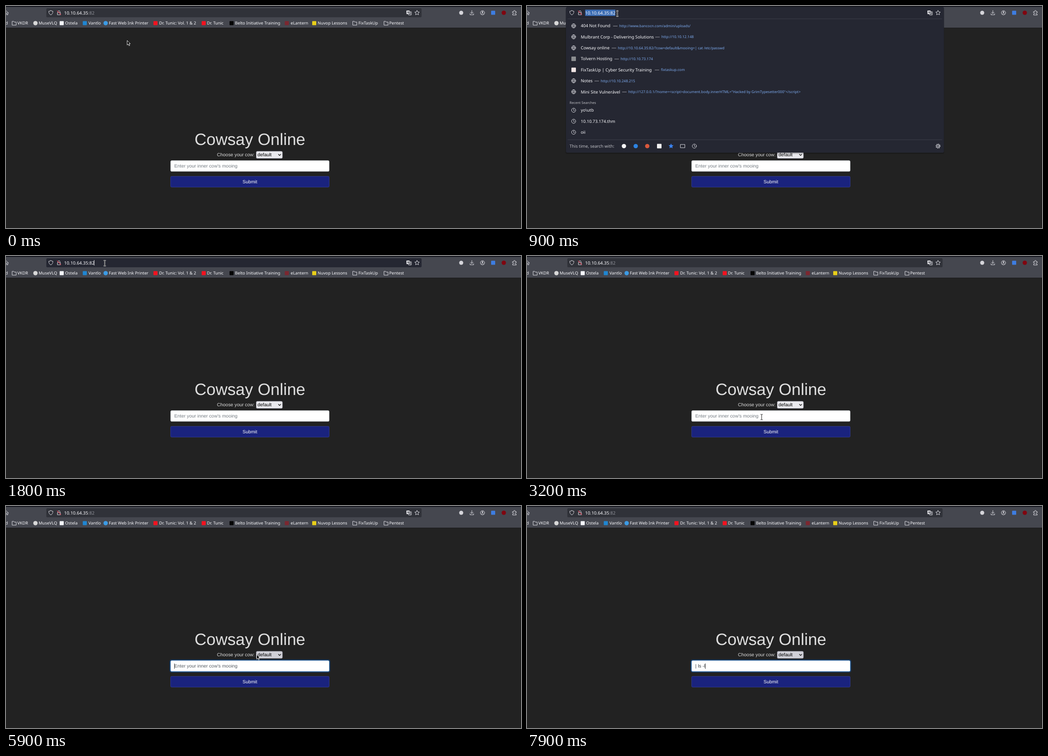
An HTML page for the animation above (8000 ms loop, 1137x492 px).

```html
<!DOCTYPE html>
<html lang="en">
<head>
<meta charset="utf-8">
<title>Cowsay Online</title>
<style>
  html, body { margin: 0; width: 100%; height: 100%; overflow: hidden; background: #222; }
  svg { display: block; width: 100vw; height: 100vh; }
  text { white-space: pre; text-rendering: geometricPrecision; }
  .ui { font-family: "Noto Sans", "Open Sans", sans-serif; fill: #fbfbfe; }
  .page { font-family: "Liberation Sans", Arial, sans-serif; font-size: 10.4px; }
  .line { fill: none; stroke: #dcdce2; stroke-width: 1; stroke-linecap: round; stroke-linejoin: round; }
</style>
</head>
<body>
<svg id="stage" viewBox="0 0 1137 492" preserveAspectRatio="none"></svg>
<script>
const LOOP = 8000, STEP = 100;
const stage = document.getElementById('stage');
const byId = id => document.getElementById(id);

const escapeText = s => s.replace(/&/g, '&amp;').replace(/</g, '&lt;');
const rect = (x, y, w, h, fill, extra = '') =>
  `<rect x="${x}" y="${y}" width="${w}" height="${h}" fill="${fill}" ${extra}/>`;
const circle = (x, y, r, fill, extra = '') => `<circle cx="${x}" cy="${y}" r="${r}" fill="${fill}" ${extra}/>`;
const line = (d, extra = '') => `<path class="line" d="${d}" ${extra}/>`;
const ui = (x, y, size, s, extra = '') =>
  `<text class="ui" x="${x}" y="${y}" font-size="${size}" ${extra}>${escapeText(s)}</text>`;
const page = (x, y, s, extra = '') => `<text class="page" x="${x}" y="${y}" ${extra}>${escapeText(s)}</text>`;
const group = (id, body, extra = '') => `<g id="${id}" ${extra}>${body}</g>`;

const square = (x, y, fill, size = 9) => rect(x - size / 2, y - size / 2, size, size, fill, 'rx="1"');
const dot = (x, y, fill) => circle(x, y, 4.8, fill);
const folder = (x, y) => line(`M${x - 4.5} ${y + 4}v-8h3.5l1.2 1.6h4.3v6.4z`);
const globe = (x, y) => circle(x, y, 4.6, 'none', 'class="line"') +
  line(`M${x - 4.6} ${y}h9.2M${x} ${y - 4.6}q-4.4 4.6 0 9.2q4.4 -4.6 0 -9.2`, 'stroke-width=".8"');
const clock = (x, y) => circle(x, y, 4.6, 'none', 'class="line"') + line(`M${x} ${y - 2.8}v3l2 1`);

function star(x, y, r, extra) {
  const points = Array.from({ length: 10 }, (_, i) => {
    const a = -Math.PI / 2 + i * Math.PI / 5, d = i % 2 ? r * .48 : r;
    return `${(x + d * Math.cos(a)).toFixed(2)},${(y + d * Math.sin(a)).toFixed(2)}`;
  });
  return `<polygon points="${points.join(' ')}" stroke-linejoin="round" ${extra}/>`;
}

function toolbar() {
  return rect(0, 0, 1137, 48, '#45474f') + rect(0, 0, 1137, 2, '#11121a') +
    line('M-4 15.5L0 10.5L5.5 15.5M4 14.5v5h-2.5v-4h-3') +
    circle(1005, 15, 4.5, '#d5d5da') +
    line('M1028.5 10v6.5M1025.5 13.8l3 3l3 -3M1024.5 17v2.5h8V17') +
    circle(1052, 15, 4.7, 'none', 'class="line"') + circle(1052, 13.5, 1.7, '#dcdce2') +
    line('M1049 18q3 -3 6 0') +
    square(1075.5, 15, '#3e7de0') + dot(1099, 15, '#800610') +
    line('M1118.5 12.5h2.5v-1.3a1.5 1.5 0 0 1 3 0v1.3h2.5v2.5h-1.2a1.5 1.5 0 0 0 0 3h1.2v2h-8v-2.5h1a1.3 1.3 0 0 0 0 -2.6h-1z');
}

function bookmarks() {
  const items = [
    [-1.5, 'd'],
    [25, 'VKDR', folder, 18],
    [72, 'MuseVLQ', dot, 65, '#d8d8d8'],
    [130.5, 'Ostela', square, 123, '#f4f6fb'],
    [182, 'Vantlo', square, 174, '#1f86d2'],
    [227, 'Fast Web Ink Printer', dot, 220, '#3c9be5'],
    [338, 'Dr. Tunic: Vol. 1 & 2', square, 330, '#f5121f'],
    [443.5, 'Dr. Tunic', square, 436.5, '#f5121f'],
    [505.5, 'Belto Initiative Training', square, 498, '#050505'],
    [628.5, 'eLantern', square, 620, '#7b2730'],
    [688, 'Nuvop Lessons', square, 680.5, '#e9cf19'],
    [778, 'FixTaskUp', folder, 770],
    [846, 'Pentest', folder, 839]
  ];
  return items.map(([x, label, icon, iconX, color]) =>
    (icon ? icon(iconX, 38, color) : '') + ui(x, 41.3, 9.2, label)).join('');
}

function suggestions() {
  const rows = [
    ['404 Not Found', 204, 'http://www.bancocn.com/admin/uploads/'],
    ['Mulbrant Corp - Delivering Solutions', 297, 'http://10.10.12.148'],
    ['Cowsay online', 201, 'http://10.10.64.35:82/?cow=default&mooing=| cat /etc/passwd'],
    ['Tolvern Hosting', 207, 'http://10.10.73.174', '#8b8d90'],
    ['FixTaskUp | Cyber Security Training', 296, 'fixtaskup.com', '#f0e4e4'],
    ['Notes', 163, 'http://10.10.248.215'],
    ['Mini Site Vulnerável', 224,
      'http://127.0.0.1/?nome=<script>document.body.innerHTML="Hacked by GrimTypesetter000"<\/script>']
  ];
  const visited = rows.map(([title, urlX, url, color], i) => {
    const y = 44 + i * 24.35;
    return (color ? square(103, y, color, 10) : globe(103, y)) + ui(118.7, y + 3.4, 9.45, title) +
      line(`M${urlX - 13.5} ${y + .5}h9`, 'stroke-width=".8" opacity=".65"') +
      ui(urlX - .3, y + 3, 8, url, 'style="fill:#7dabf0"');
  });
  const recent = ['yo\\utb', '10.10.73.174.thm', 'oii'].map((s, i) => {
    const y = 231 + i * 24.4;
    return clock(103, y) + ui(118.7, y + 3.4, 9.35, s);
  });
  const y = 310.5;
  const gear = circle(907.5, y, 3.6, 'none', 'class="line"') + circle(907.5, y, 1.3, 'none', 'class="line"') +
    circle(907.5, y, 4.6, 'none', 'stroke="#dcdce2" stroke-width="1.3" stroke-dasharray="1.8 1.81"');
  return rect(85, 4, 836, 324, '#000', 'rx="4" opacity=".2"') +
    rect(86, 2, 834.5, 323, '#252732', 'rx="3"') +
    line('M90 28.5H916M90 296.5H916', 'style="stroke:#3b3d48"') +
    visited.join('') + ui(94, 217.3, 7.6, 'Recent Searches', 'opacity=".72"') + recent.join('') +
    ui(94, 314, 9.45, 'This time, search with:', 'opacity=".72"') +
    dot(214, y, '#f4f4f4') + dot(240, y, '#2d83e2') + dot(265.5, y, '#d9583c') +
    square(292, y, '#f2f2f2', 10) + star(318, y, 5.8, 'fill="#3a83f4"') +
    line(`M339 ${y - 3.6}h9.5v7.2h-9.5z`) + clock(369.5, y) + gear;
}

function addressBar() {
  return rect(128.5, 8, 66.5, 14, '#3b6db4', 'id="selection"') +
    line('M99 10.2q2 1.3 4.5 1.3q.3 6 -4.5 8.3q-4.8 -2.3 -4.5 -8.3q2.5 0 4.5 -1.3z') +
    line('M114.8 14.5v-1.8a2.2 2.2 0 0 1 4.4 0v1.8M113.8 14.8h6.4v4.7h-6.4z') +
    line('M113 10.8l8 8.4', 'style="stroke:#e8384f;stroke-width:1.2"') +
    `<text class="ui" x="128.3" y="18.7" font-size="9.87">10.10.64.35<tspan id="port">:82</tspan></text>` +
    rect(194.2, 9, .9, 12, '#fbfbfe', 'id="urlCaret"') +
    rect(884, 10, 7, 8, '#e4e4e8', 'rx="1"') +
    rect(888.5, 12.5, 6.5, 7.5, '#3a3c45', 'rx="1" stroke="#e4e4e8" stroke-width=".9"') +
    line('M885.8 15.8l1.7 -4l1.2 3', 'style="stroke:#30323a"') +
    line('M890 15h3.5M891.8 14q0 2.5 -1.8 4M890.5 15.5l2.8 2.7', 'stroke-width=".7"') +
    star(907.5, 15.2, 5.4, 'class="line"');
}

function webPage() {
  return rect(0, 48, 1137, 444, '#222') + rect(1136, 48, 1, 444, '#151515') +
    rect(0, 48, 1137, .6, '#17181c') +
    page(538.5, 307.7, 'Cowsay Online', 'style="font-size:36.4px" text-anchor="middle" fill="#dedede"') +
    page(465.8, 333.3, 'Choose your cow:', 'fill="#dedede"') +
    rect(552.4, 321.9, 57.9, 15.8, '#e9e9ed', 'id="select" rx="2.5" stroke="#8f8f9d" stroke-width=".7"') +
    page(555.3, 333.3, 'default', 'fill="#000"') +
    line('M601.5 328.7l2.5 2.5l2.5 -2.5', 'style="stroke:#111;stroke-width:1.3"') +
    rect(362.1, 341.2, 352.8, 26.7, 'none', 'id="ring" rx="3.5" stroke="#007bff" stroke-width="2.1"') +
    rect(363.4, 342.6, 350.1, 24, '#fff', 'id="field" rx="2.6" stroke-width=".7"') +
    page(371.6, 358.4, "Enter your inner cow's mooing", 'id="placeholder"') +
    page(371.6, 358.4, '', 'id="typed" fill="#333a40"') +
    rect(371.5, 349, .9, 12, '#222', 'id="caret"') +
    rect(363.4, 377.4, 350.1, 24, '#1a237e', 'rx="2.3" stroke="#3a459f" stroke-width=".7"') +
    page(538.4, 393.3, 'Submit', 'text-anchor="middle" fill="#fff"') +
    group('history', '');
}

const arrow = '<path d="M.5 .5V10.5L2.800 8.300L4.600 12.100L6.200 11.400L4.500 7.700H7.500Z" fill="#000" stroke="#fff" stroke-width=".9"/>';
const beamPath = 'M-2.5 -6H-.5L0 -5.5L.5 -6H2.5M0 -5.5V5.5M-2.5 6H-.5L0 5.5L.5 6H2.5';
const beam = `<path d="${beamPath}" fill="none" stroke="#fff" stroke-width="2.2"/>` +
  `<path d="${beamPath}" fill="none" stroke="#111" stroke-width="1"/>`;

stage.innerHTML = toolbar() + bookmarks() + webPage() +
  rect(89, 5, 828.5, 20, '#303239', 'id="bar" rx="2.5"') +
  group('suggestions', suggestions()) + addressBar() +
  group('pointer', group('arrow', arrow) + group('beam', beam));

const path = [
  [0, 267, 76], [300, 205, 35], [500, 169, 17], [600, 196, 17], [800, 196, 17], [1200, 218, 16],
  [2300, 218, 16], [3200, 518, 357], [3900, 518, 357], [4000, 519, 356], [4100, 519, 356],
  [4400, 553, 329], [LOOP, 553, 329]
];
const keystrokes = [
  [6300, '|'], [6800, '| '], [7500, '| l'], [7600, '| ls'], [7700, '| ls '], [7800, '| ls -'], [7900, '| ls -l']
];
const pastEntries = ['| ls', '| id', '| pwd', '| whoami'];

function pointerAt(t) {
  const i = path.findIndex(([end], n) => n > 0 && t <= end);
  const [t0, x0, y0] = path[i - 1], [t1, x1, y1] = path[i];
  const p = (t - t0) / (t1 - t0), k = p * p * (3 - 2 * p);
  return [x0 + (x1 - x0) * k, y0 + (y1 - y0) * k];
}

const show = (id, on) => { byId(id).style.display = on ? '' : 'none'; };
const within = (x, y, l, t, r, b) => x >= l && x <= r && y >= t && y <= b;

function drawPointer(t) {
  const [x, y] = pointerAt(t);
  const overText = y < 25 || within(x, y, 363, 343, 713, 367) || within(x, y, 417, 277, 660, 314);
  byId('pointer').setAttribute('transform', `translate(${x} ${y})`);
  show('pointer', t < 6300);
  show('arrow', !overText);
  show('beam', overText);
}

function drawAddress(t) {
  const focused = t >= 900 && t < 1900;
  show('suggestions', t >= 900 && t < 1800);
  show('selection', t >= 900 && t < 1400);
  show('urlCaret', t >= 1400 && t < 1900);
  byId('bar').setAttribute('fill', focused ? '#252732' : '#303239');
  byId('port').style.fill = focused ? '#fbfbfe' : '#92949b';
}

function drawHistory(typed) {
  const rows = typed ? pastEntries.filter(s => s.startsWith(typed) && s !== typed) : [];
  byId('history').innerHTML = rows.length === 0 ? '' :
    rect(363.5, 368, 350, 2 + rows.length * 20, '#2b2a33', 'stroke="#52525e" stroke-width=".8"') +
    rows.map((s, i) => ui(372, 382 + i * 20, 9.4, s)).join('');
}

function drawForm(t) {
  const focus = Math.max(0, Math.min(1, (t - 3400) / 200));
  const typed = keystrokes.reduce((last, [at, s]) => t >= at ? s : last, '');
  byId('ring').setAttribute('opacity', focus * .3);
  byId('field').setAttribute('stroke', focus ? '#80bdff' : '#ced4da');
  byId('placeholder').setAttribute('fill', focus ? '#565d64' : '#757c83');
  byId('select').setAttribute('fill', t >= 4400 ? '#d0d0d7' : '#e9e9ed');
  show('placeholder', !typed);
  byId('typed').textContent = typed;
  const width = typed ? byId('typed').getComputedTextLength() : 0;
  byId('caret').setAttribute('x', 371.5 + width);
  show('caret', focus && !(t >= 4700 && t < 5900) && !(t >= 7100 && t < 7500));
  drawHistory(typed);
}

function frame() {
  const t = Math.floor(performance.now() % LOOP / STEP) * STEP;
  drawPointer(t);
  drawAddress(t);
  drawForm(t);
  requestAnimationFrame(frame);
}
frame();
</script>
</body>
</html>
```
